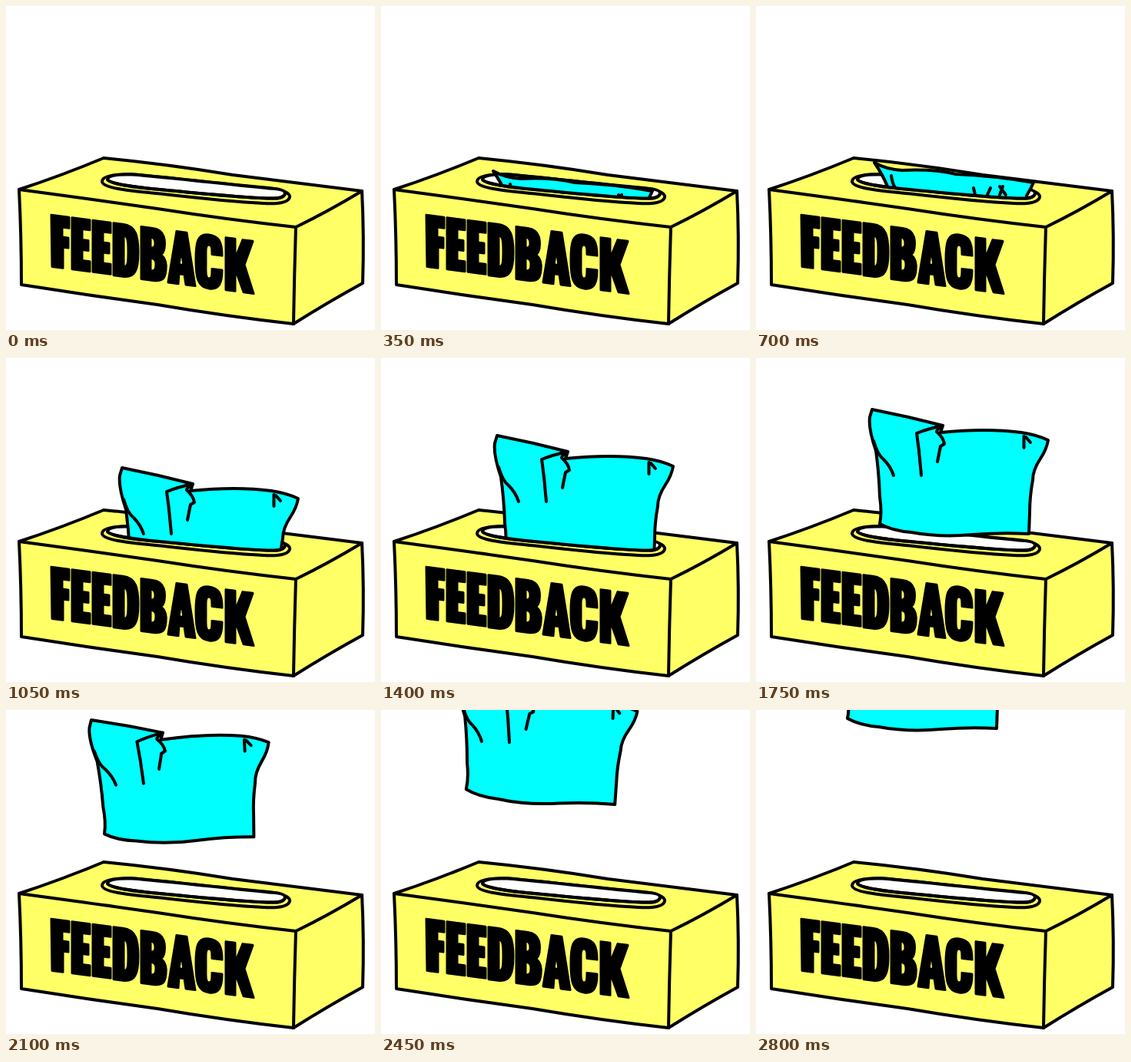
Recreate the animation shown at these times as an HTML page. Size 480 px wide and 422 px high, loop 3150 ms.

```html
<!DOCTYPE html>
<html lang="en">
<head>
<meta charset="utf-8">
<title>Feedback box</title>
<style>
  html, body { margin: 0; width: 100%; height: 100%; overflow: hidden; background: #fff; }
  svg { display: block; width: 100vw; height: 100vh; }
  .ink { stroke: #000; stroke-width: 4; stroke-linejoin: round; stroke-linecap: round; fill: none; }
  .box { fill: #ff6; }
  .tissue { fill: #0ff; }
  .hole { fill: #fff; }
  .letters { stroke: #000; stroke-width: 3; stroke-linejoin: round; fill-rule: evenodd; }
</style>
</head>
<body>
<svg viewBox="0 0 480 422" role="img" aria-label="FEEDBACK">
  <defs>
    <clipPath id="above">
      <path d="M0 0H480V244H363C362 250 354 251 340 250.500C300 249 240 243 200 239C165 236 134 231 132 226H0Z"/>
    </clipPath>
  </defs>

  <g class="ink">
    <path class="box" d="M17 239Q72 221 127 198Q210 206 295 220Q380 231 463 241Q466 300 464 361Q420 385 374 414Q285 404 197 389Q108 377 20 363Q20 300 17 239Z"/>
    <path d="M17 239Q107 251 197 264Q287 278 377 288Q420 267 463 241M377 288Q375 350 374 414"/>
    <path class="box" d="M125 228C126 221 143 219 162 219C210 223 285 232 342 237C360 239 370 244 369 249C367 257 352 258 335 257C295 255 240 249 205 245C165 241 124 238 125 228Z"/>
    <path class="hole" d="M132 226C133 220 148 219 164 219.500C210 223 285 232 342 237.500C355 238 363 240 363 244C362 250 354 251 340 250.500C300 249 240 243 200 239C165 236 134 231 132 226Z"/>
  </g>

  <g class="ink" clip-path="url(#above)">
    <g id="tip">
      <path class="tissue" d="M154 204Q170 213 190 214Q230 212 260 219Q310 221 361 230Q357 239 352 247V275H180L171 235Q165 220 154 204Z"/>
      <path d="M176 221Q177 230 181 237M283 237L285 246M305 237L300 248M317 235L325 246M321 235L317 246"/>
    </g>
    <g id="sheet">
      <path class="tissue" d="M151 101Q197 110 243 122L240 131Q300 125 345 131Q365 134 380 141Q378 153 370 165Q360 180 360 193Q356 215 356 235L355 263Q320 261 282 264Q240 268 202 261Q177 259 161 250Q164 235 161 215Q160 184 156 155Q146 126 148 111Z"/>
      <path d="M243 122Q224 126 209 132L212 155L215 187M241 124Q235 127 235 130Q244 138 245 146L240 149Q238 159 236 169M153 142Q158 160 166 166Q175 175 179 187M348.500 136V151M351 137L357 144"/>
    </g>
  </g>
  <path class="ink" d="M363 244C362 250 354 251 340 250.500C300 249 240 243 200 239C165 236 134 231 132 226"/>

  <g id="word" class="letters" transform="matrix(1 .13 0 1 57 270)"></g>
</svg>
<script>
  const E = 'M1 2H24V15H14V29H22V42H14V56H24V69H1Z';
  // x offset and outline of each hand-drawn letter
  const letters = [
    [0, 'M2 2H25V16H16V29H24V42H17V69H3Z'],
    [28, E],
    [55, E],
    [82, 'M1 2H13C30 2 33 14 33 36S29 70 13 70H1Z M14 16V57C20 57 20 50 20 36S19 16 14 16Z'],
    [118, 'M1 2H16C33 2 32 18 31 26C30 32 28 34 26 35C33 38 34 48 33 54C32 66 28 70 16 70H1Z M13 14V28C20 28 19 22 19 21S19 14 13 14Z M13 41V58C20 58 20 52 20 49S20 41 13 41Z'],
    [154, 'M11 2H24L35 70H23L21 57H14L13 70H0Z M17 24L14 45H20Z'],
    [190, 'M34 26H21C21 18 21 14 17 14C12 14 13 22 13 36S12 58 17 58C21 58 21 54 21 45H34C34 62 30 71 17 71C2 71 0 58 0 36S2 1 17 1C30 1 34 8 34 26Z'],
    [228, 'M1 2H13V28L23 2H36L25 34L37 70H24L15 46L13 50V70H1Z']
  ];
  const byId = id => document.getElementById(id);
  byId('word').innerHTML = letters
    .map(([x, d]) => `<path transform="translate(${x})" d="${d}"/>`).join('');

  const HOLD = 350;
  // visible part, x, y, turn in degrees
  const poses = [
    null,
    ['tip', -8, 11, 0],
    ['tip', 0, 0, 0],
    ['sheet', 0, 42, 0],
    ['sheet', 0, 0, 0],
    ['sheet', 0, -34, 0],
    ['sheet', -40, -88, -2.7],
    ['sheet', -45, -147, 2],
    ['sheet', -42, -239, 0]
  ];
  const parts = ['tip', 'sheet'].map(byId);

  function draw() {
    const step = Math.floor(performance.now() / HOLD) % poses.length;
    const [name, x, y, turn] = poses[step] || [];
    for (const part of parts) {
      const on = part.id === name;
      part.setAttribute('visibility', on ? 'visible' : 'hidden');
      if (on) part.setAttribute('transform', `translate(${x} ${y}) rotate(${turn} 151 101)`);
    }
    requestAnimationFrame(draw);
  }
  draw();
</script>
</body>
</html>
```
